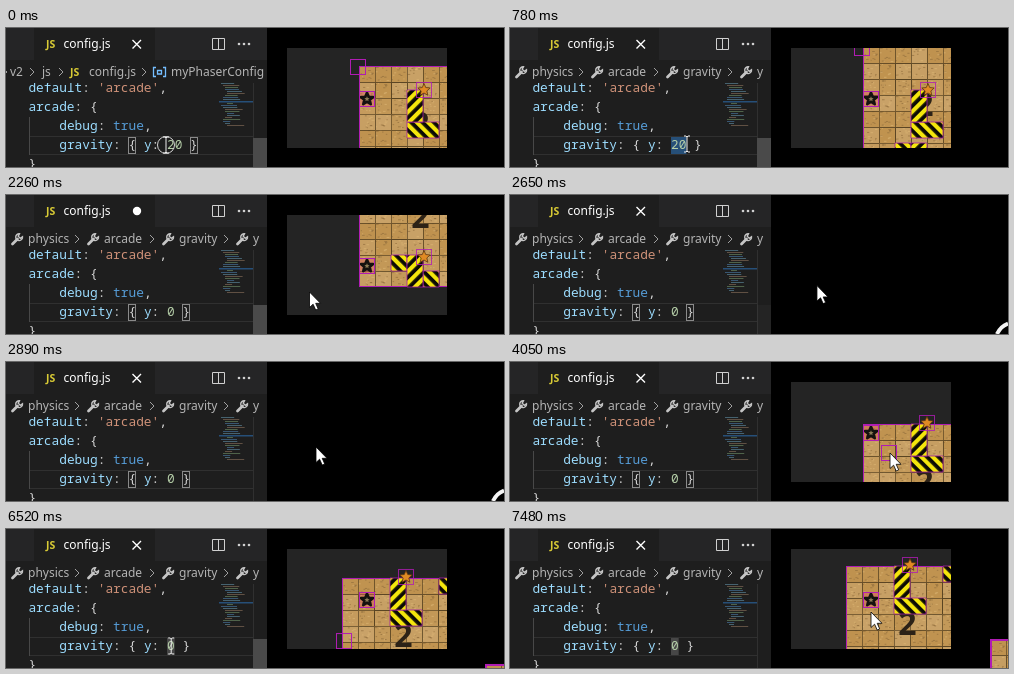
An HTML page for the animation above (8 s loop, 498 px wide and 139 px high).

```html
<!DOCTYPE html>
<html lang="en">
<head>
<meta charset="utf-8">
<title>Gravity setting</title>
<style>
html, body { margin: 0; width: 100%; height: 100%; overflow: hidden; background: #000; }
svg { display: block; width: 498px; height: 139px; }
text { white-space: pre; }
.ui { font: 12px "Noto Sans", "Open Sans", sans-serif; fill: #b4b4b4; }
.code { font: 12.83px "Noto Sans Mono", "DejaVu Sans Mono", monospace; fill: #d4d4d4; }
.prop { fill: #9cdcfe; }
.str { fill: #ce9178; }
.bool { fill: #569cd6; }
.num { fill: #b5cea8; }
.js { font: bold 10.5px "Open Sans", sans-serif; fill: #d8ca35; }
.line { fill: none; stroke: #d0d0d0; }
.debug { fill: none; stroke: #b01cb4; }
</style>
</head>
<body>
<svg viewBox="0 0 498 139">
  <defs>
    <pattern id="sand" width="64" height="64" patternUnits="userSpaceOnUse"></pattern>
    <pattern id="hazard" width="8" height="8" patternUnits="userSpaceOnUse" patternTransform="rotate(-45)">
      <rect width="8" height="8" fill="#0c0b05"/>
      <rect width="4.2" height="8" fill="#f4e60c"/>
    </pattern>
    <pattern id="hazardUp" href="#hazard" patternTransform="rotate(45)"/>
    <clipPath id="stage"><rect x="281" y="20" width="160" height="100"/></clipPath>
    <clipPath id="codeArea"><rect y="55" width="261" height="84"/></clipPath>
    <path id="chevron" class="line" d="M0 0l4 4-4 4" style="stroke:#a0a0a0"/>
    <g id="wrench" fill="none" stroke="#c5c5c5">
      <path d="M1.500 11l5-5" stroke-width="2.8" stroke-linecap="round"/>
      <path d="M8.500 .8a3.400 3.400 0 1 0 3 3L9.300 5.300 7.200 3.200z" stroke-width="1.4"/>
    </g>
  </defs>
  <rect width="498" height="139"/>

  <g id="game" clip-path="url(#stage)">
    <rect x="281" y="20" width="160" height="100" fill="#242424"/>
    <g id="map">
      <rect width="240" height="128" fill="url(#sand)"/>
      <text x="61.5" y="69" text-anchor="middle" font-family="Open Sans, sans-serif" font-weight="bold" font-size="32" fill="#2c2217">2</text>
      <rect class="debug" x=".5" y=".5" width="240" height="127"/>
      <g fill="url(#hazard)" stroke="#a21ca6" stroke-width=".8">
        <path d="M32 96h16v16h-16zM64 112h16v16h-16z"/>
        <path d="M48 96h16v32h-16z" fill="url(#hazardUp)"/>
        <path d="M97 0h16v16h-16z"/>
        <g id="block">
          <path d="M48 32h32v16h-32z"/>
          <path d="M48 0h16v32h-16z" fill="url(#hazardUp)"/>
        </g>
      </g>
    </g>
    <g id="gem">
      <path class="star" fill="#e08a24" stroke="#5c3510" stroke-width=".8"/>
      <rect class="debug" x="-7.5" y="-7.5" width="15" height="15" opacity=".8"/>
    </g>
    <g transform="translate(361 71)">
      <rect x="-7" y="-7" width="14" height="14" fill="#e0506a" opacity=".35"/>
      <path class="star" fill="#15120f" stroke="#15120f" stroke-width="2.4" stroke-linejoin="round"/>
      <path class="star" fill="#8c7c56" transform="scale(.42)"/>
      <rect class="debug" x="-7.5" y="-7.5" width="15" height="15"/>
    </g>
    <rect id="body" class="debug" x="-7.5" y="-7.5" width="15" height="15"/>
  </g>
  <g id="patch">
    <rect width="80" height="80" fill="url(#sand)"/>
    <path class="debug" d="M1 80V1H80" stroke-width="2"/>
  </g>
  <path id="spinner" d="M487 139A20 20 0 0 1 498 128.500" fill="none" stroke="#f4f4f4" stroke-width="4"/>

  <g id="editor">
    <rect width="261" height="139" fill="#1e1e1e"/>
    <path d="M0 0h28v32H0zM149 0h112v32H149z" fill="#252526"/>
    <text class="js" x="40" y="20">JS</text>
    <text class="ui" x="57.5" y="20" style="fill:#fff">config.js</text>
    <circle id="dirty" cx="131" cy="16" r="4.2" fill="#fff"/>
    <path id="close" class="line" d="M126.500 12l8.500 8.500m0-8.500l-8.500 8.500" stroke-width="1.4" style="stroke:#fff"/>
    <path class="line" d="M206.500 10.500h12v11h-12zM212.500 10v11"/>
    <g fill="#d0d0d0">
      <circle cx="233" cy="16" r="1.300"/><circle cx="238" cy="16" r="1.300"/><circle cx="243" cy="16" r="1.300"/>
    </g>
    <g id="filePath"></g>
    <g id="propPath"></g>

    <g clip-path="url(#codeArea)">
      <path d="M24 108.500H247M24 126.500H247" stroke="#303030"/>
      <path d="M23.500 89V127" stroke="#484848"/>
      <rect id="pick" x="161" y="109" height="17"/>
      <g id="code"></g>
      <g id="braces" fill="none" stroke="#8a8a8a">
        <rect x="122.500" y="109.500" width="7" height="16"/>
        <rect id="endBox" y="109.500" width="7" height="16"/>
      </g>
      <g id="minimap"></g>
      <rect id="lens" x="207" y="66" width="40" height="56" fill="#797979"/>
      <path d="M247.500 55V139" stroke="#303030"/>
      <rect id="slider" x="247" y="110" width="14" height="29" fill="#4a4a4a"/>
    </g>
  </g>

  <circle id="press" cx="160" cy="117" r="8.500" class="line"/>
  <path id="arrow" d="M0 0V15.500L3.600 12.200 6.200 18 8.700 16.900 6.200 11.300H11z" fill="#fff" stroke="#000" stroke-width=".8"/>
  <path id="beam" class="line" d="M-3 -8h2l1 1 1-1h2M0 -7V7M-3 8h2l1-1 1 1h2" style="stroke:#eee"/>
</svg>

<script>
const LOOP = 8000, CHAR = 7.7, LEFT = 22.4;
const $ = id => document.getElementById(id);

function add(parent, tag, attrs, text) {
  const el = document.createElementNS('http://www.w3.org/2000/svg', tag);
  for (const k in attrs) el.setAttribute(k, attrs[k]);
  if (text) el.textContent = text;
  return parent.appendChild(el);
}

let seed = 17;
const rand = () => (seed = seed * 16807 % 2147483647) / 2147483647;

// Cracked sandstone tiles
const sand = $('sand');
for (let i = 0; i < 16; i++) {
  const x = i % 4 * 16, y = (i >> 2) * 16;
  add(sand, 'rect', { x, y, width: 16, height: 16, fill: `hsl(36 47% ${53 + rand() * 7}%)` });
  for (let n = 0; n < 12; n++) {
    add(sand, 'rect', {
      x: x + rand() * 13, y: y + rand() * 14, width: 1 + rand() * 2, height: 1,
      fill: rand() < .55 ? '#8f6c3a' : '#dcb674', opacity: .65
    });
  }
  add(sand, 'path', {
    d: `M${x} ${y + .5}h16M${x + .5} ${y}v16`,
    stroke: '#54401f', 'stroke-width': 1, opacity: .65 + rand() * .35
  });
}

let starPath = '';
for (let i = 0; i < 10; i++) {
  const r = i % 2 ? 3 : 6.5, a = i * Math.PI / 5;
  starPath += `${i ? 'L' : 'M'}${r * Math.sin(a)} ${-r * Math.cos(a)}`;
}
document.querySelectorAll('.star').forEach(s => s.setAttribute('d', starPath + 'z'));

// Breadcrumbs
const label = (g, x, text, cls = 'ui') => add(g, 'text', { x, y: 48, class: cls }, text);
const mark = (g, href, x, y) => add(g, 'use', { href, x, y });
const filePath = $('filePath'), propPath = $('propPath');
label(filePath, 4, 'v2');
label(filePath, 36, 'js');
label(filePath, 64, 'JS', 'js');
label(filePath, 83, 'config.js');
label(filePath, 165, 'myPhaserConfig');
[-3, 24, 53, 136].forEach(x => mark(filePath, '#chevron', x, 40));
add(filePath, 'path', {
  d: 'M150 39.500h-2.500v9h2.500M157 39.500h2.500v9h-2.500M151.500 42.500h4v3.500h-4z',
  fill: 'none', stroke: '#75beff', 'stroke-width': 1.3
});
['physics', 'arcade', 'gravity', 'y'].forEach((name, i) => {
  const x = [5, 81, 156, 230][i];
  mark(propPath, '#wrench', x, 38);
  label(propPath, x + 17, name);
  if (i) mark(propPath, '#chevron', x - 12, 40);
});

// Code, as words placed on a character grid
function word(col, y, text, cls = '') {
  return add($('code'), 'text', { x: LEFT + col * CHAR, y, class: 'code ' + cls }, text);
}
word(0, 64, 'default', 'prop');
word(7, 64, ':');
word(9, 64, "'arcade'", 'str');
word(17, 64, ',');
word(0, 83, 'arcade', 'prop');
word(6, 83, ': {');
word(4, 102, 'debug', 'prop');
word(9, 102, ':');
word(11, 102, 'true', 'bool');
word(15, 102, ',');
word(4, 121, 'gravity', 'prop');
word(11, 121, ': {');
word(15, 121, 'y', 'prop');
word(16, 121, ':');
const value = word(18, 121, '20', 'num');
const endBrace = word(21, 121, '}');
word(0, 140, '}');

const indents = [0, 1, 2, 2, 3, 3, 2, 1, 1, 2, 3];
for (let i = 0; i < 22; i++) {
  const x = 215 + indents[i % 11] * 2;
  add($('minimap'), 'rect', {
    x, y: 55 + i * 2, width: 4 + rand() * 14, height: 1,
    fill: ['#53788a', '#76604f', '#5f7a58', '#41698c'][i % 4], opacity: .75
  });
}
add($('minimap'), 'rect', { x: 213, y: 73, width: 34, height: 1.5, fill: '#264f78' });

// Linear keyframes: rows of [time, value, ...]
function track(t, rows) {
  const i = rows.findIndex(r => r[0] > t);
  if (i < 0) return rows[rows.length - 1].slice(1);
  if (!i) return rows[0].slice(1);
  const a = rows[i - 1], b = rows[i], k = (t - a[0]) / (b[0] - a[0]);
  return a.slice(1).map((v, n) => v + (b[n + 1] - v) * k);
}

const mouse = [
  [120, 160, 117], [780, 177, 116], [1650, 177, 116], [2260, 303.5, 97],
  [2380, 303.5, 97], [2890, 310, 85], [3270, 310, 85], [4050, 380, 91],
  [4350, 380, 91], [5280, 194.5, 122], [5400, 194.5, 122], [5900, 165, 117],
  [6520, 165, 117], [7480, 361, 83]
];
const fall = [[120, 353, 38], [780, 353, 19], [930, 353, 19], [1080, 353, 13], [1230, 353, 13], [2260, 353, -36]];
const walk = [[4350, 353, 62], [5280, 336, 49], [6520, 336, 49], [7480, 336, 37]];
const loose = [[3270, 361, 71], [4050, 379, 91], [4350, 379, 91], [5280, 338, 112], [6520, 338, 112], [7000, 338, 132]];

const show = (id, on) => $(id).style.display = on ? '' : 'none';
const move = (id, x, y) => $(id).setAttribute('transform', `translate(${x} ${y})`);
const fade = (id, t, rows) => $(id).style.opacity = track(t, rows)[0];
const within = (t, a, b) => t >= a && t < b;

function draw(t) {
  const falling = t < 2890;
  const [mx, my] = track(t, falling ? fall : walk);
  show('game', !within(t, 2520, 3400));
  move('map', mx, my);
  // Under gravity the loose block drops along with the player
  move('block', 0, falling ? 62 - my : 0);
  show('block', !within(t, 1950, 2890));
  move('gem', falling ? 418 : mx + 64, falling ? 62 : my - 1);
  move('body', ...(falling ? [mx - 1, my + 1] : track(t, loose)));

  show('spinner', within(t, 2640, 3400));
  move('patch', ...track(t, [[5000, 479, 139], [5280, 479, 135], [6520, 479, 135], [7480, 480, 110]]));

  const edited = t >= 1360, dirty = within(t, 1360, 2510);
  show('dirty', dirty);
  show('close', !dirty);
  show('filePath', t < 390);
  show('propPath', t >= 390);
  value.textContent = edited ? '0' : '20';
  const endX = LEFT + (edited ? 20 : 21) * CHAR;
  endBrace.setAttribute('x', endX);
  $('endBox').setAttribute('x', Math.floor(endX) + .5);

  const [x, y] = track(t, mouse);
  const dragging = within(t, 390, 1360), picked = t >= 6080;
  const chars = dragging ? Math.min(2, Math.max(0, Math.round((x - 161) / CHAR))) : +picked;
  $('pick').setAttribute('width', chars * CHAR);
  $('pick').setAttribute('fill', dragging ? '#264f78' : '#474747');
  show('braces', !dragging && !picked);
  fade('slider', t, [[2380, 1], [2700, 0], [5020, 0], [5200, 1], [6900, 1], [7350, 0]]);
  fade('lens', t, [[5020, 0], [5200, .17], [5400, .17], [5700, 0]]);

  show('press', t < 120);
  show('beam', x < 261);
  show('arrow', x >= 261);
  move('beam', x, y);
  move('arrow', x, y);
}

const start = performance.now();
function tick() {
  draw((performance.now() - start) % LOOP);
  requestAnimationFrame(tick);
}
tick();
</script>
</body>
</html>
```
